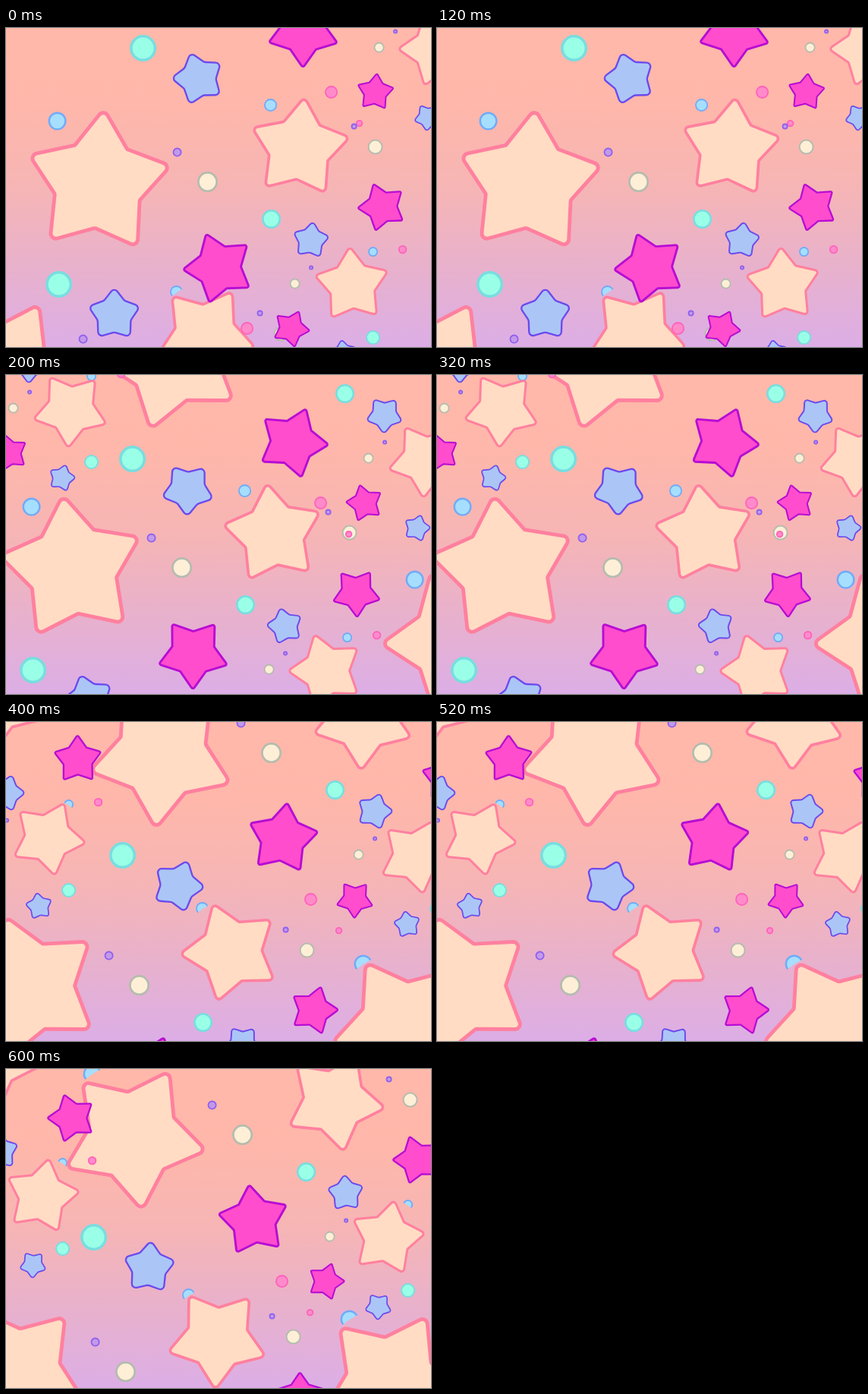
An HTML page with a canvas that plays this animation: 560x420 px, repeating every 800 ms.

```html
<!DOCTYPE html>
<html lang="en">
<head>
<meta charset="utf-8">
<title>Drifting stars</title>
<style>
  html, body { margin: 0; width: 100%; height: 100%; overflow: hidden; }
  body { background: #ffb8a9; }
  canvas { display: block; width: 560px; height: 420px; }
</style>
</head>
<body>
<canvas id="stage" width="560" height="420"></canvas>
<script>
const W = 560, H = 420, HOLD = 200, STEPS = 4;
const ctx = document.getElementById('stage').getContext('2d');

const COLORS = {
  peach:  ['#ffdcc3', '#ff809f'],
  pink:   ['#ff4dcd', '#b80cd4'],
  blue:   ['#abc6f6', '#6b4aee'],
  mint:   ['#99ffe6', '#78dde0'],
  sky:    ['#a6deff', '#70abf8'],
  cream:  ['#ffefd7', '#b4bcae'],
  rose:   ['#ff8aca', '#ff62bc'],
  violet: ['#c39ae9', '#9060ef']
};

// Valley depth, tip rounding and valley rounding, relative to the radius
const SHAPES = {
  peach: { depth: 0.63, tip: 0.07, valley: 0.03 },
  pink:  { depth: 0.63, tip: 0.05, valley: 0.02 },
  blue:  { depth: 0.71, tip: 0.15, valley: 0.2 }
};

const dot = (x, y, r) => ({ x, y, r });
const star = (x, y, r, turn) => ({ x, y, r, turn });

// One field of shapes, back to front; the copies below all show parts of it
const field = {
  sky: [dot(67, 122, 12), dot(348, 101, 8.5), dot(483, 294, 6.5)],
  cream: [dot(265, 202, 13.5), dot(486, 156, 10), dot(380, 336, 7)],
  peach: [star(121, 204, 96, -7.5), star(386, 158, 66.5, -7.5), star(455.5, 338, 50, -18)],
  mint: [dot(69, 337, 17.5), dot(349, 251, 12.5), dot(483, 407, 9.5)],
  blue: [star(142, 377, 33.5, -17), star(401, 279, 23.5, -14), star(444, 428, 17.5, 40)],
  pink: [star(280, 315, 47.5, -35.5), star(495, 235, 32.5, 34), star(375, 395, 25, 5)],
  rose: [dot(317, 395, 8.5), dot(522, 291, 5.7), dot(354, 436, 4.7)],
  violet: [dot(225, 163, 6), dot(458, 129, 4), dot(401.5, 315, 3)]
};

// Each copy drifts down and left; path gives its offset at every step
const copies = [
  { lap: 1, path: [[0, 0], [-34, 51], [-90, 144], [-108, 196]] },
  { lap: 0, path: [[111, -311], [97, -227], [84, -162], [46, -116]] },
  { lap: 3, path: [[-124, 246]] },
  { lap: 0, path: [, [-371, -293], [-401, -186], [-409, -171]] },
  { lap: 0, path: [, [471, 147], [403, 196], [385, 207]] }
];

const backdrop = ctx.createLinearGradient(0, 0, 0, H);
['#ffb8a9', '#feb7aa', '#f6b5b5', '#e8b1cc', '#dcaee6']
  .forEach((color, i) => backdrop.addColorStop(i / 4, color));

// Small stars spin faster
const spin = r => 9 + 270 / r;

function paint([fill, stroke], width) {
  ctx.fillStyle = fill;
  ctx.strokeStyle = stroke;
  ctx.lineWidth = width;
  ctx.fill();
  ctx.stroke();
}

function drawDot(x, y, r, colors) {
  const width = Math.max(1.8, r * 0.2);
  ctx.beginPath();
  ctx.arc(x, y, r - width / 2, 0, 2 * Math.PI);
  paint(colors, width);
}

function drawStar(x, y, r, turn, { depth, tip, valley }, colors) {
  const line = 1 + r * 0.04;
  const edge = r - line / 2;
  const points = Array.from({ length: 10 }, (_, i) => {
    const a = (turn + i * 36) * Math.PI / 180;
    const d = i % 2 ? edge * depth : edge + 0.7 * tip * r;
    return [x + d * Math.sin(a), y - d * Math.cos(a)];
  });
  const [first, last] = [points[0], points[9]];
  ctx.beginPath();
  ctx.moveTo((first[0] + last[0]) / 2, (first[1] + last[1]) / 2);
  points.forEach((p, i) => ctx.arcTo(...p, ...points[(i + 1) % 10], r * (i % 2 ? valley : tip)));
  ctx.closePath();
  paint(colors, line);
}

// Later copies lose the part of a sky dot that its star sweeps over
function clipSweep({ x, y, r }, dx, dy) {
  ctx.beginPath();
  ctx.rect(0, 0, W, H);
  ctx.arc(x + dx, y + dy, r * 1.02, 0, 2 * Math.PI);
  ctx.clip('evenodd');
}

function draw(step) {
  ctx.fillStyle = backdrop;
  ctx.fillRect(0, 0, W, H);
  for (const [kind, items] of Object.entries(field)) {
    items.forEach((item, i) => {
      for (const { lap, path } of copies) {
        if (!path[step]) continue;
        const [dx, dy] = path[step].map(v => v + 0.6);
        const x = item.x + dx, y = item.y + dy;
        ctx.save();
        if (kind in SHAPES) {
          const turn = item.turn - spin(item.r) * (step - lap);
          drawStar(x, y, item.r, turn, SHAPES[kind], COLORS[kind]);
        } else {
          if (kind === 'sky' && Math.max(step, lap) > 1) clipSweep(field.peach[i], dx, dy);
          drawDot(x, y, item.r, COLORS[kind]);
        }
        ctx.restore();
      }
    });
  }
}

ctx.lineJoin = 'round';
let shown = -1;
function tick() {
  const step = Math.floor(performance.now() / HOLD) % STEPS;
  if (step !== shown) draw(shown = step);
  requestAnimationFrame(tick);
}
tick();
</script>
</body>
</html>
```
